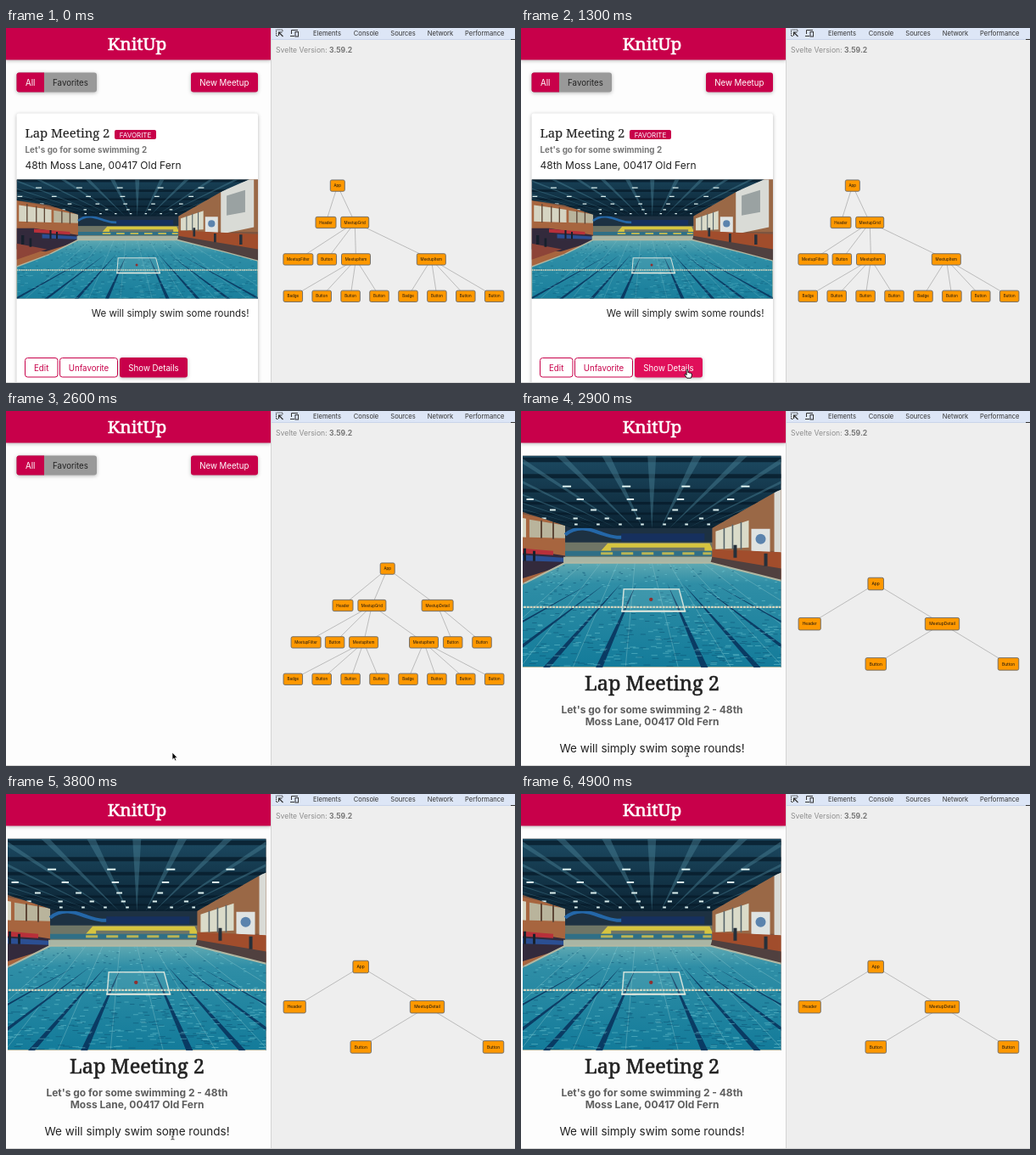
Recreate the animation shown at these times as an HTML page. Size 600 by 418 pixels, loop 5000 ms.

```html
<!DOCTYPE html>
<html lang="en">
<head>
<meta charset="utf-8">
<title>Meetup list and component tree</title>
<style>
  html, body { margin: 0; width: 100%; height: 100%; overflow: hidden; background: #fff; }
  svg.stage { display: block; width: 100%; height: 100%; }
  text { font-family: Inter, Roboto, sans-serif; fill: #222; }
  .slab { font-family: "Noto Serif", serif; font-weight: 500; stroke: #222; stroke-width: .15; }
  .heavy { stroke-width: .6; }
  .mid { text-anchor: middle; }
  .end { text-anchor: end; }
  .white { fill: #fff; }
  .slab.white { stroke: #fff; }
  .red { fill: #c8004a; }
  .sub { font-weight: 700; fill: #777; }
  .dark { fill: #5e5e5e; }
  .btn { font-size: 9.7px; }
  .tab { font-size: 7.6px; fill: #333; text-anchor: middle; }
  .outline { fill: #fff; stroke: #c8004a; }
  .shadow { filter: drop-shadow(0 1px 2px rgba(0, 0, 0, .28)); }
  .edge { stroke: #999; stroke-width: .6; }
  .node { fill: #ff9800; stroke: #666; stroke-width: .9; }
  .label { font-size: 4.5px; text-anchor: middle; fill: #111; }

  .anim { animation: 5s step-end infinite; }
  .before { animation-name: before; }
  .after { animation-name: after; }
  .tree1 { animation-name: tree1; }
  .tree2 { animation-name: tree2; }
  .hand { animation-name: hand; }
  .arrow { animation-name: arrow; }
  .beam { animation-name: beam; }
  .hover { animation-name: hover; }
  .cursor { animation-name: move; }
  .card { animation-name: shrink; transform-origin: 154.5px 260.5px; }

  @keyframes before { 0% { opacity: 1 } 54%, 100% { opacity: 0 } }
  @keyframes after { 0% { opacity: 0 } 54%, 100% { opacity: 1 } }
  @keyframes tree1 { 0% { opacity: 1 } 46%, 100% { opacity: 0 } }
  @keyframes tree2 { 0% { opacity: 0 } 46% { opacity: 1 } 54%, 100% { opacity: 0 } }
  @keyframes hand { 0% { opacity: 0 } 8% { opacity: 1 } 48%, 100% { opacity: 0 } }
  @keyframes arrow { 0% { opacity: 1 } 8% { opacity: 0 } 48% { opacity: 1 } 54% { opacity: 0 } 92%, 100% { opacity: 1 } }
  @keyframes beam { 0% { opacity: 0 } 54% { opacity: 1 } 92%, 100% { opacity: 0 } }
  @keyframes hover { 0% { fill: #c8004a } 8%, 100% { fill: #e00f5a } }
  /* cubic ease: size and opacity are 1 - p^3 */
  @keyframes shrink {
    0% { transform: scale(1); opacity: 1 }
    46% { transform: scale(.984); opacity: .984 }
    48% { transform: scale(.875); opacity: .875 }
    50% { transform: scale(.578); opacity: .578 }
    52%, 100% { transform: scale(0); opacity: 0 }
  }
  @keyframes move {
    0% { transform: translate(206px, 430px); animation-timing-function: steps(3) }
    6% { transform: translate(204px, 415px); animation-timing-function: steps(3) }
    12% { transform: translate(200px, 405px); animation-timing-function: steps(6) }
    24% { transform: translate(196px, 402px) }
    74% { transform: translate(196px, 402px); animation-timing-function: steps(5) }
    84% { transform: translate(198px, 402px) }
    88% { transform: translate(198px, 403px); animation-timing-function: steps(4) }
    96% { transform: translate(199px, 414px) }
    98%, 100% { transform: translate(206px, 430px) }
  }
</style>
</head>
<body>
<svg class="stage" viewBox="0 0 600 418" preserveAspectRatio="none">
  <defs>
    <linearGradient id="water" x2="0" y2="1">
      <stop offset="0" stop-color="#5fa9b2"/>
      <stop offset=".2" stop-color="#2f8ea6"/>
      <stop offset="1" stop-color="#137b9a"/>
    </linearGradient>
    <linearGradient id="roof" x2="0" y2="1">
      <stop offset="0" stop-color="#1c4a62"/>
      <stop offset="1" stop-color="#0b2333"/>
    </linearGradient>
    <clipPath id="roofClip"><path d="M0 0H416V15L355 42L279 85H114L56 66L0 58Z"/></clipPath>
    <clipPath id="waterClip"><path d="M106 126H277L360 147L416 162V249H0V172L56 151Z"/></clipPath>
    <symbol id="pool" viewBox="0 0 416 249" preserveAspectRatio="xMidYMid slice">
      <rect width="416" height="249" fill="#7d5540"/>
      <path d="M0 58L114 80V126L0 172Z" fill="#a7653f"/>
      <path d="M4 66L60 74V96L4 94Z" fill="#d5d4c2"/>
      <path d="M64 75L106 82V97L64 96Z" fill="#b9b49c"/>
      <path d="M18 64V96M34 68V96M48 70V96M78 76V97M92 78V98" stroke="#5d4636" stroke-width="2"/>
      <path d="M0 106H30L108 118V128L50 146L0 142Z" fill="#332a3c"/>
      <path d="M30 107L92 112V117L30 113Z" fill="#b8303a"/>
      <path d="M44 116L104 120V125L44 123Z" fill="#2b4f93"/>
      <path d="M0 132L52 142L0 160Z" fill="#8d4438"/>
      <path d="M8 134v-16h5v16M22 138v-15h4v15M57 124v-15h3v15M68 124v-12h3v12" fill="#17202c"/>
      <rect x="106" y="80" width="174" height="46" fill="#6f7566"/>
      <rect x="106" y="82" width="174" height="20" fill="#1d3142"/>
      <path d="M106 93C122 80 138 88 150 92S172 98 184 94" fill="none" stroke="#2467a8" stroke-width="4"/>
      <path d="M172 96H270" stroke="#16305e" stroke-width="9"/>
      <path d="M148 112L156 103H276L280 112H270V108H160V112Z" fill="#d6c440"/>
      <path d="M106 112H279V118H106Z" fill="#2f6f86"/>
      <path d="M148 115H278" stroke="#b9b556" stroke-width="3" stroke-dasharray="14 10"/>
      <path d="M104 119H279V126H104Z" fill="#a9b5a4"/>
      <path d="M279 84L355 42L416 15V112L279 112Z" fill="#9a6846"/>
      <path d="M283 89L322 76V108L283 110Z" fill="#dadbc9"/>
      <path d="M293 85V110M303 81V110M313 78V110" stroke="#56646a" stroke-width="1.6"/>
      <path d="M325 86H347V114L325 112Z" fill="#dfe3e2"/>
      <circle cx="336" cy="98" r="6" fill="#5b83ad"/>
      <path d="M352 38L409 18V104L352 116Z" fill="#d9dbd6"/>
      <path d="M362 50L394 40V78L362 84Z" fill="#9aa2a2"/>
      <path d="M279 110L416 116V160L360 145L279 126Z" fill="#a14d2c"/>
      <path d="M279 119L416 142V162L360 147L277 126Z" fill="#50403f"/>
      <path d="M304 120v-15h4v15M340 130v-15h4v15M384 134v-17h5v17" fill="#26303a"/>
      <path d="M0 0H416V15L355 42L279 85H114L56 66L0 58Z" fill="url(#roof)"/>
      <g id="roofParts" clip-path="url(#roofClip)"></g>
      <path d="M106 126H277L360 147L416 162V249H0V172L56 151Z" fill="url(#water)" stroke="#b3b8a2" stroke-width="2"/>
      <g id="waterParts" clip-path="url(#waterClip)"></g>
      <path d="M0 178H416" stroke="#cfd2bd" stroke-width="2.2" stroke-dasharray="3 .8"/>
      <path d="M173 183L175 157H240L247 183" fill="#bfe0df" fill-opacity=".12" stroke="#cfe0da" stroke-width="1.5"/>
      <path d="M172 183H248" stroke="#e8ebdf" stroke-width="2"/>
      <circle cx="207" cy="169" r="2.2" fill="#8f3030"/>
    </symbol>
  </defs>

  <rect width="312" height="418" fill="#fdfdfd"/>

  <g class="anim before">
    <g class="shadow">
      <rect x="12.5" y="52.5" width="94.5" height="23" rx="3" fill="#999"/>
      <path d="M45 52.5H15.5a3 3 0 0 0-3 3v17a3 3 0 0 0 3 3H45Z" class="red"/>
      <rect x="218" y="52.5" width="79" height="23" rx="3" class="red"/>
    </g>
    <text class="btn mid white" x="28.7" y="67.6">All</text>
    <text class="btn mid" x="76" y="67.6">Favorites</text>
    <text class="btn mid white" x="257.3" y="67.6">New Meetup</text>

    <g class="anim card">
      <rect class="shadow" x="12.5" y="100.5" width="284.5" height="321" rx="3" fill="#fff"/>
      <text class="slab" x="22.5" y="129" font-size="14.8">Lap Meeting 2</text>
      <rect class="red" x="128" y="120" width="49" height="11" rx="2"/>
      <text class="mid white" x="152.5" y="128.7" font-size="8">FAVORITE</text>
      <text class="sub" x="22.5" y="146.5" font-size="9.85">Let's go for some swimming 2</text>
      <text x="22.5" y="165.5" font-size="12">48th Moss Lane, 00417 Old Fern</text>
      <use href="#pool" x="12.5" y="178.5" width="284.5" height="140"/>
      <text class="end" x="286.5" y="340" font-size="11.5">We will simply swim some rounds!</text>
      <rect class="outline" x="22.5" y="388.5" width="38.5" height="22.5" rx="3"/>
      <rect class="outline" x="63.5" y="388.5" width="68" height="22.5" rx="3"/>
      <rect class="shadow red anim hover" x="134" y="388" width="80" height="23.5" rx="3"/>
      <text class="btn mid red" x="41.7" y="403.5">Edit</text>
      <text class="btn mid red" x="97.5" y="403.5">Unfavorite</text>
      <text class="btn mid white" x="174" y="403.5">Show Details</text>
    </g>
  </g>

  <g class="anim after">
    <use href="#pool" x="2" y="52.5" width="304.5" height="249.5"/>
    <text class="slab heavy mid" x="154.5" y="328.5" font-size="23.6">Lap Meeting 2</text>
    <text class="sub dark mid" x="154.5" y="355.5" font-size="12">Let's go for some swimming 2 - 48th</text>
    <text class="sub dark mid" x="154.5" y="370.3" font-size="12">Moss Lane, 00417 Old Fern</text>
    <text class="mid" x="154.5" y="402" font-size="13.5">We will simply swim some rounds!</text>
  </g>

  <rect class="red shadow" width="312" height="37.5"/>
  <text class="slab heavy mid white" x="154.5" y="25.5" font-size="20.8">KnitUp</text>

  <rect x="312" width="288" height="418" fill="#eee"/>
  <rect x="312" width="288" height="13" fill="#dde6f6"/>
  <path d="M312 13.5H600" stroke="#c9d5ea"/>
  <path d="M312.5 0V418M0 417.5H600" stroke="#d4d4d4"/>
  <path d="M595 13.5H600" stroke="#333"/>
  <g fill="none" stroke="#333">
    <path d="M326 4V2H318.5V9.5H320.5" stroke-dasharray="1.4 .8"/>
    <path d="M321.5 5L326.5 10M321.5 9V5H325.5" stroke-width="1.2"/>
    <path d="M336.5 7V2.5H344M335 9.5H340"/>
    <rect x="341" y="4.5" width="3.5" height="5.5"/>
  </g>
  <text class="tab" x="378.5" y="8.6">Elements</text>
  <text class="tab" x="424.5" y="8.6">Console</text>
  <text class="tab" x="468" y="8.6">Sources</text>
  <text class="tab" x="512" y="8.6">Network</text>
  <text class="tab" x="564.3" y="8.6">Performance</text>
  <text x="318" y="29" font-size="8.6" style="fill:#8c8c8c">Svelte Version: <tspan font-weight="700" fill="#777">3.59.2</tspan></text>

  <g id="trees"></g>

  <g class="anim cursor">
    <path class="anim arrow" d="M0 0V8.6L2 6.8L3.4 9.8L4.8 9.2L3.5 6.3H6Z" fill="#000" stroke="#fff" stroke-width=".7"/>
    <path class="anim hand" d="M-.9 .6Q0-.6 .9 .6V3.8Q2 3 2.6 4.2Q3.6 3.6 4.1 4.7Q5.2 4.4 5.3 5.6V7.4L4.4 10.2H-.4L-3 6.6Q-3.2 5.2-1.8 5.6L-.9 6.6Z" fill="#fff" stroke="#000" stroke-width=".9"/>
    <path class="anim beam" d="M-2-4.5Q0-4.5 0-3.4Q0-4.5 2-4.5M0-3.4V3.8M-2 4.9Q0 4.9 0 3.8Q0 4.9 2 4.9M-1 1.6H1" fill="none" stroke="#222" stroke-width=".9"/>
  </g>
</svg>
<script>
  const NS = "http://www.w3.org/2000/svg";
  const $ = id => document.getElementById(id);

  function add(parent, tag, attrs, text) {
    const el = document.createElementNS(NS, tag);
    for (const k in attrs) el.setAttribute(k, attrs[k]);
    if (text) el.textContent = text;
    parent.append(el);
    return el;
  }

  // Component trees: each item is [label, x, child, child, ...]
  const widths = {
    App: 17, Header: 24, MeetupGrid: 33, MeetupFilter: 35,
    MeetupItem: 34, MeetupDetail: 37, Button: 22.5, Badge: 22.5
  };
  const leaves = start => ["Badge", "Button", "Button", "Button"].map((n, i) => [n, start + i * 33.9]);
  const grid = (x, filter, button, item1, item2) => ["MeetupGrid", x,
    ["MeetupFilter", filter], ["Button", button],
    ["MeetupItem", item1, ...leaves(338.3)], ["MeetupItem", item2, ...leaves(474)]];

  function drawTree(cls, root, top, step, zoom) {
    const g = add($("trees"), "g", { class: "anim " + cls });
    const lines = add(g, "g", { class: "edge" });
    (function visit([name, x, ...kids], y) {
      for (const kid of kids) {
        add(lines, "line", { x1: x, y1: y, x2: kid[1], y2: y + step });
        visit(kid, y + step);
      }
      const w = widths[name] * zoom, h = 13.3 * zoom;
      add(g, "rect", { class: "node", x: x - w / 2, y: y - h / 2, width: w, height: h, rx: 1.8 });
      add(g, "text", { class: "label", x, y: y + 1.6, style: `font-size:${4.5 * zoom}px` }, name);
    })(root, top);
  }

  drawTree("tree1", ["App", 390.8, ["Header", 377], grid(411.2, 344.4, 378.3, 412.5, 501.3)], 185.6, 43.4, 1);
  drawTree("tree2", ["App", 449.7, ["Header", 397], grid(431.4, 353.6, 387.6, 421.6, 492.5),
    ["MeetupDetail", 508.6, ["Button", 526.7], ["Button", 561]]], 185.6, 43.4, 1);
  drawTree("after", ["App", 418.2, ["Header", 340.2],
    ["MeetupDetail", 496.5, ["Button", 418.3], ["Button", 574.5]]], 203.5, 47.2, 1.09);

  // Pool hall: girders, lamps, lane lines and ripples
  const roof = $("roofParts"), water = $("waterParts");
  let rails = "", girders = "", lamps = "", floats = "", lanes = "";
  for (let k = -8; k <= 8; k++)
    rails += `M${208 + k * 10} 86L${208 + k * 54 - 2 - 3} 0h10Z`;
  for (let d = 1; d < 8; d++) {
    const y = 84 - 3.1 * d ** 1.7;
    girders += `M0 ${y + 3}H416v${d * .7 + .6}H0Z`;
    if (d < 6) for (let k = -5.5; k < 6; k++)
      lamps += `M${208 + k * (15 + 11 * d)} ${y}h${2 + d * 1.6}`;
  }
  for (let k = -4; k <= 4; k++) {
    floats += `M${208 + k * 20} 126L${208 + k * 62 + 31} 249`;
    if (k) lanes += `M${208 + k * 18} 150L${208 + k * 62 - 4} 249h8Z`;
  }
  add(roof, "path", { d: girders, fill: "#061a28", opacity: .75 });
  add(roof, "path", { d: rails, fill: "#4b8294", opacity: .45 });
  add(roof, "path", { d: lamps, stroke: "#dcefee", "stroke-width": 2 });
  add(water, "path", { d: floats, stroke: "#8cc7cd", "stroke-width": .8, opacity: .5 });
  add(water, "path", { d: lanes, fill: "#08305a", opacity: .85 });

  let seed = 7;
  const rnd = () => (seed = seed * 16807 % 2147483647) / 2147483647;
  function ripples(count, stroke, opacity) {
    let d = "";
    for (let i = 0; i < count; i++) {
      const p = rnd();
      d += `M${(rnd() * 416).toFixed(1)} ${(128 + p * 120).toFixed(1)}h${(2 + p * 6).toFixed(1)}`;
    }
    add(water, "path", { d, stroke, opacity, "stroke-width": 1 });
  }
  ripples(420, "#0a4f70", .5);
  ripples(420, "#6fc6d2", .5);
</script>
</body>
</html>
```
